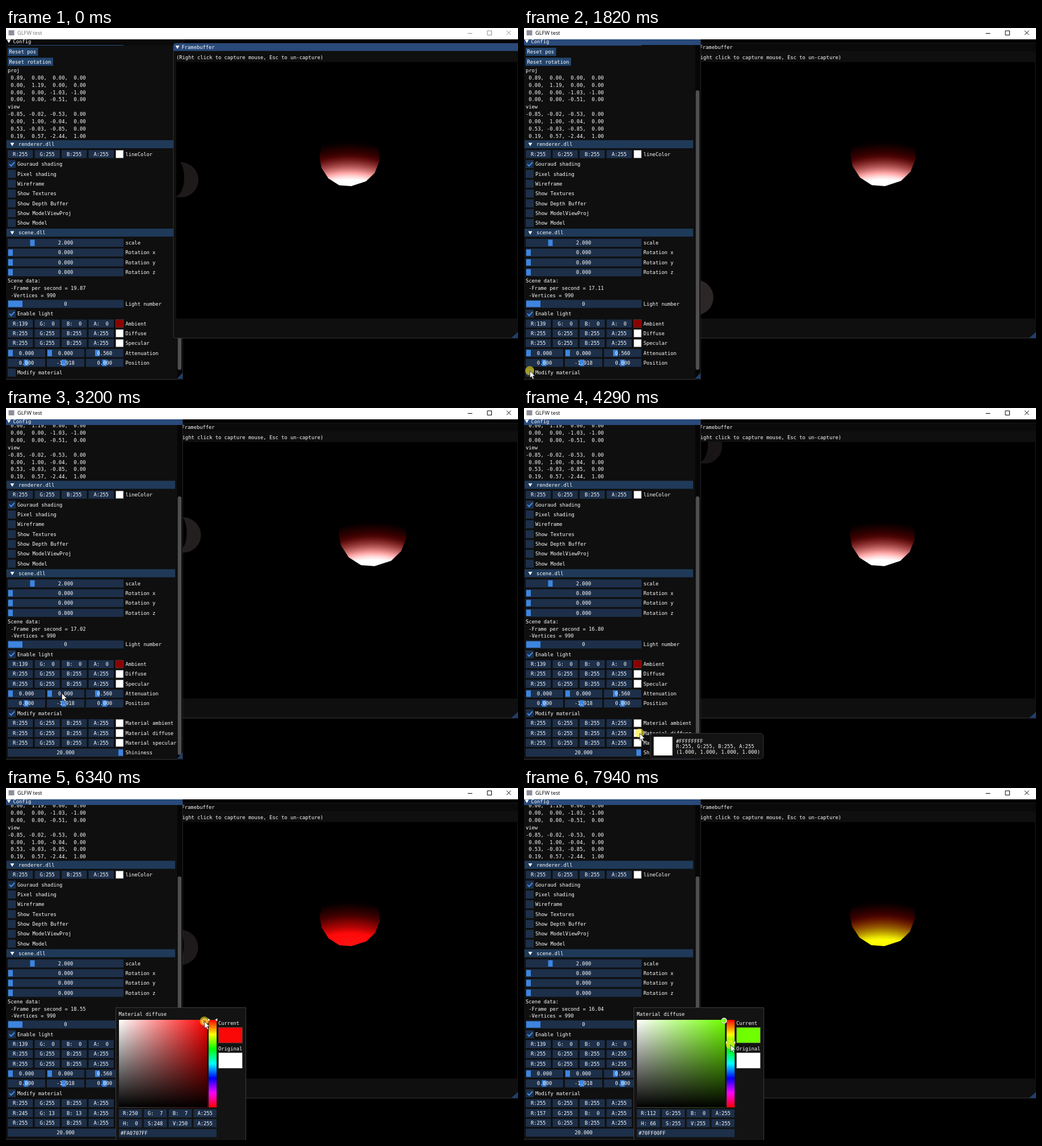
These frames come from a looping animation (902x621 px, 8000 ms). An HTML page:

```html
<!DOCTYPE html>
<html lang="en">
<head>
<meta charset="utf-8">
<title>GLFW test</title>
<style>
html, body { margin: 0; width: 100%; height: 100%; overflow: hidden; background: #000; }
svg { display: block; width: 902px; height: 621px; }
text { font: 8.79px "DejaVu Sans Mono", monospace; fill: #fff; white-space: pre; }
.app { font: 9.3px "Open Sans", sans-serif; }
</style>
</head>
<body>
<svg id="stage" viewBox="0 0 902 621" xmlns="http://www.w3.org/2000/svg"></svg>
<script>
const LOOP = 8000;
const FOCUS = 1750, CHECK = 1860, POPUP = 4420;
const SV_DRAG = [5520, 6600], HUE_DRAG = [6980, LOOP];
const PRESSES = [[1740, 1860], [4200, 4400], SV_DRAG, HUE_DRAG];
const FRAME = '#1d2f49', BUTTON = '#23456d', HEADER = '#1f3958', TITLE = '#294a7a';
const GRAB = '#3d85e0', BG = '#0f0f0f', BORDER = '#34343c';

// time, x, y of the pointer
const POINTER = [
  [280, 800, 640], [420, 640, 580], [820, 125, 480], [1000, 110, 492], [1560, 14, 603],
  [1740, 10, 605], [2050, 12, 605], [2590, 76, 483], [3150, 92, 500], [3450, 130, 520],
  [4050, 203, 573], [4290, 204, 574], [4550, 206, 572], [5200, 300, 446], [5520, 306, 442],
  [6150, 340, 420], [6500, 358, 405], [6650, 358, 405], [6950, 365, 411], [7000, 365, 412],
  [7170, 365, 412], [7240, 365, 413], [7940, 364, 453], [8000, 364, 456]
];
const FPS = [[0, 19.87], [820, 17.07], [2590, 17.14], [4290, 16.8], [5450, 17.08], [7240, 20.03], [7940, 16.04]];
const HULL = [
  [-1, 0], [-.93, .37], [-.7, .72], [-.34, .95], [.06, .98], [.55, .82], [.84, .54],
  [1, .14], [.98, -.16], [.9, -.42], [.6, -.8], [-.6, -.8], [-.9, -.42]
];

const clamp = (v, lo = 0, hi = 1) => Math.min(hi, Math.max(lo, v));
const within = (t, [a, b]) => t >= a && t < b;
const css = c => `rgb(${c.map(Math.round)})`;

function track(keys, t) {
  const i = keys.findIndex(k => k[0] > t);
  if (i === 0) return keys[0].slice(1);
  if (i < 0) return keys[keys.length - 1].slice(1);
  const a = keys[i - 1], b = keys[i], f = (t - a[0]) / (b[0] - a[0]);
  return a.slice(1).map((v, n) => v + (b[n + 1] - v) * f);
}

function hsv(h, s, v) {
  return [5, 3, 1].map(n => {
    const k = (n + h * 6) % 6;
    return 255 * v * (1 - s * clamp(Math.min(k, 4 - k)));
  });
}

function pick(t) {
  let h = 0, s = 0, v = 1;
  if (t >= SV_DRAG[0]) {
    const [x, y] = track(POINTER, Math.min(t, SV_DRAG[1]));
    s = clamp((x - 199) / 155);
    v = clamp(1 - (y - 409) / 154);
  }
  if (t >= HUE_DRAG[0]) h = clamp((track(POINTER, t - 70)[1] - 409) / 154);
  return { h, s, v, rgb: hsv(h, s, v) };
}

// Drawing helpers; y of a row is its centre
const rect = (x, y, w, h, fill, more = '') =>
  `<rect x="${x}" y="${y}" width="${w}" height="${h}" fill="${fill}" ${more}/>`;
const poly = (pts, fill, more = '') => `<polygon points="${pts}" fill="${fill}" ${more}/>`;
const label = (x, y, s, more = '') => `<text x="${x}" y="${y + 3.2}" ${more}>${s}</text>`;
const mid = (x, y, s) => label(x, y, s, 'text-anchor="middle"');
const arrow = (x, y) => poly(`${x - 3.5},${y - 2.5} ${x + 3.5},${y - 2.5} ${x},${y + 3.5}`, '#fff');
const box = (x, y, w, fill = FRAME) => rect(x, y - 7.1, w, 14.2, fill);
const cell = (x, y, w, s) => box(x, y, w) + mid(x + w / 2, y, s);
const grab = (x, y, w = 8) => rect(x, y - 5.6, w, 11.2, GRAB);
const swatch = (x, y, w, h, fill) => rect(x, y, w, h, fill, 'stroke="#555" stroke-width=".6"');
const field = (k, v) => `${k}:${String(Math.round(v)).padStart(3)}`;

function fields(x, y, w, step, names, vals) {
  return vals.map((v, i) => cell(x + i * step, y, w, field(names[i], v))).join('');
}
function colorRow(y, name, rgb, a = 255) {
  return fields(3, y, 44.3, 47.5, 'RGBA', [...rgb, a]) +
    swatch(193.3, y - 6.8, 13.6, 13.6, css(rgb)) + label(210.5, y, name);
}
function slider(y, name, value, x, w) {
  return box(3, y, 204) + grab(x, y, w) + mid(105, y, value) + label(210.5, y, name);
}
function triple(y, name, values, grabs) {
  return values.map((v, i) => box(3 + i * 68.9, y, 66) + grab(grabs[i], y) + mid(36 + i * 68.9, y, v)).join('') +
    label(210.5, y, name);
}
function check(y, name, on) {
  const tick = `<path d="M6 ${y}l3 3.4l6-6.6" fill="none" stroke="#4296fa" stroke-width="1.8"/>`;
  return box(3, y, 14.2) + (on ? tick : '') + label(20, y, name);
}
const header = (y, name) => box(1, y, 297, HEADER) + arrow(11, y) + label(22, y, name);
const button = (y, name, w) => box(3, y, w, BUTTON) + label(5.5, y, name);

function matrix(y, rows) {
  return rows.map((r, i) => label(3, y + i * 12.8, r.map(v => v.toFixed(2).padStart(5)).join(', '))).join('');
}

function planet(t, rgb) {
  const right = 682 - 24 * Math.cos(1.0175 * (t / 1000 - 6.115));
  const left = 552 + .711 * (right - 658);
  const cx = (left + right) / 2, r = (right - left) / 2, cy = 279 - .98 * r;
  let stops = '';
  for (let y = 280; y >= 196; y -= 6) {
    const a = .66 * clamp((y - 201) / 33), d = Math.pow(Math.max(0, (y - 222) / 44), 1.6);
    const c = rgb.map((v, i) => Math.min(255, (i ? 0 : 139 * a) + v * d));
    stops += `<stop offset="${(405 - y) / 209}" stop-color="${css(c)}"/>`;
  }
  return `<radialGradient id="lit" gradientUnits="userSpaceOnUse" cx="${cx}" cy="405" r="209">${stops}</radialGradient>` +
    poly(HULL.map(([x, y]) => [cx + x * r, cy + y * r]).join(' '), 'url(#lit)');
}

function moon(t) {
  const p = t / 1000, s = Math.sin(p), c = Math.cos(p);
  const x = 310 - 8 * s - 2 * c, y = 251.6 + (s > 0 ? 235 : 195) * s + 16 * c;
  const g = 33 + 11 * Math.sin(p - .3);
  return `<circle cx="${x}" cy="${y}" r="31" fill="${css([g, g * .86, g * .88])}"/>` +
    `<ellipse cx="${x - 10}" cy="${y - 4}" rx="16" ry="33" fill="#000"/>`;
}

function framebuffer(t, focused) {
  return rect(295, 27, 612, 520, BG, `rx="4" stroke="${BORDER}"`) +
    `<path d="M295 40.5V31q0-4 4-4H902V40.5z" fill="${focused ? TITLE : '#0a0a0a'}"/>` +
    arrow(302, 33.5) + label(309.5, 34, 'Framebuffer') +
    label(300, 52, '(Right click to capture mouse, Esc to un-capture)') +
    rect(300, 60, 600, 452.5, '#000') +
    `<g clip-path="url(#view)">${moon(t)}${planet(t, pick(t - 80).rgb)}</g>` +
    poly('902,536 902,547 890,547', '#1f3f6b');
}

function config(t, focused) {
  const checked = t >= CHECK;
  const scroll = t > 2960 ? 69.5 : t > 2860 ? 65 : 0;
  const white = [255, 255, 255];
  const bar = !checked ? [110, 493] : [101 + scroll * .79, 463 - scroll * .1];
  const rows = rect(3, 16, 204, 15, TITLE) +
    button(42, 'Reset pos', 53.5) + button(59.5, 'Reset rotation', 80) +
    label(3, 75, 'proj') +
    matrix(87.7, [[.89, 0, 0, 0], [0, 1.19, 0, 0], [0, 0, -1.03, -1], [0, 0, -.51, 0]]) +
    label(3, 139, 'view') +
    matrix(152, [[-.85, -.02, -.53, 0], [0, 1, -.04, 0], [.53, -.03, -.85, 0], [.19, .57, -2.44, 1]]) +
    header(205, 'renderer.dll') + colorRow(222.5, 'lineColor', white) +
    ['Gouraud shading', 'Pixel shading', 'Wireframe', 'Show Textures', 'Show Depth Buffer', 'Show ModelViewProj', 'Show Model']
      .map((s, i) => check(240 + i * 17.35, s, i === 0)).join('') +
    header(361, 'scene.dll') + slider(379, 'scale', '2.000', 42.5) +
    [...'xyz'].map((s, i) => slider(396.2 + i * 17.35, 'Rotation ' + s, '0.000', 4)).join('') +
    label(3, 446, 'Scene data:') +
    label(3, 459, ` -Frame per second = ${track(FPS, t)[0].toFixed(2)}`) +
    label(3, 471.7, ' -Vertices = 990') +
    slider(486.7, 'Light number', '0', 4, 25) + check(504, 'Enable light', true) +
    colorRow(521.4, 'Ambient', [139, 0, 0], 0) + colorRow(538.7, 'Diffuse', white) + colorRow(556, 'Specular', white) +
    triple(573.4, 'Attenuation', ['0.000', '0.000', '0.560'], [4, 73, 157]) +
    triple(590.7, 'Position', ['0.000', '-1.918', '0.000'], [31.5, 98, 169.5]) +
    check(608, 'Modify material', checked) +
    (checked ? colorRow(625.5, 'Material ambient', white) +
      colorRow(643, 'Material diffuse', pick(t - 80).rgb) +
      colorRow(660.2, 'Material specular', white) + slider(677.5, 'Shininess', '20.000', 198) : '');
  return rect(-1, 18, 312, 602, BG, `stroke="${BORDER}"`) +
    `<g clip-path="url(#body)"><g transform="translate(0 ${-scroll})">${rows}</g></g>` +
    rect(301.5, 30, 9, 590, '#060606') + rect(302.5, bar[0], 6.5, bar[1], '#4f4f4f', 'rx="3"') +
    poly('311,608 311,619 301,619', '#1f3f6b') +
    rect(0, 20, 311, 10, focused ? TITLE : '#0a0a0a') + arrow(5, 23) + label(12.5, 23.5, 'Config');
}

function tooltip(x) {
  return rect(x, 574, 199, 45, '#131313', `rx="5" stroke="${BORDER}"`) +
    rect(x + 6, 580, 33, 33, '#fff') +
    ['#FFFFFFFF', 'R:255, G:255, B:255, A:255', '(1.000, 1.000, 1.000, 1.000)']
      .map((s, i) => label(x + 45.5, 587.3 + i * 9.9, s)).join('');
}

function popup(t) {
  const { h, s, v, rgb } = pick(t);
  const x = clamp(199 + 155 * s, 200.5, 352.5), y = clamp(409 + 154 * (1 - v), 410.5, 562);
  const hy = 409 + 154 * h;
  const hex = rgb.map(c => Math.round(c).toString(16).padStart(2, '0')).join('').toUpperCase();
  const nib = 'stroke="#222" stroke-width=".5"';
  return rect(193.5, 387.5, 229, 250, '#131313', 'stroke="#3c3c44"') +
    label(198.5, 398.5, 'Material diffuse') +
    `<linearGradient id="sat"><stop stop-color="#fff"/><stop offset="1" stop-color="${css(hsv(h, 1, 1))}"/></linearGradient>` +
    rect(199, 409, 155, 154.5, 'url(#sat)') + rect(199, 409, 155, 154.5, 'url(#val)') +
    rect(357, 409, 14, 154.5, 'url(#hue)') +
    poly(`355.5,${hy - 3} 360,${hy} 355.5,${hy + 3}`, '#fff', nib) +
    poly(`372.5,${hy - 3} 368,${hy} 372.5,${hy + 3}`, '#fff', nib) +
    `<circle cx="${x}" cy="${y}" r="5.2" fill="#666"/>` +
    `<circle cx="${x}" cy="${y}" r="4.3" fill="${css(rgb)}" stroke="#fff" stroke-width="1.2"/>` +
    label(374, 414.5, 'Current') + swatch(374.3, 422.3, 42, 27.5, css(rgb)) +
    label(374, 459.3, 'Original') + swatch(374.3, 467, 42, 27.5, '#fff') +
    fields(199, 574, 40.5, 43.8, 'RGBA', [...rgb, 255]) +
    fields(199, 591.4, 40.5, 43.8, 'HSVA', [h * 255, s * 255, v * 255, 255]) +
    box(199, 608.7, 172) + label(202, 608.7, `#${hex}FF`);
}

function titleBar(active) {
  const ink = active ? '#000' : '#8a8a8a';
  return rect(0, 0, 902, 20, '#fff') + rect(4.5, 4, 10, 9, '#8d8f9b') +
    `<text class="app" x="20" y="12" style="fill:${active ? '#000' : '#777'}">GLFW test</text>` +
    `<path d="M813.5 9.5h8M848 5h7.5v7.5h-7.5zM882 4.7l7.5 7.5m0-7.5l-7.5 7.5" fill="none" stroke="${ink}"/>`;
}

function pointer(t) {
  const [x, y] = track(POINTER, t);
  const halo = PRESSES.some(p => within(t, p)) ? `<circle cx="${x - .5}" cy="${y - .5}" r="8" fill="#ffeb1e" opacity=".58"/>` : '';
  return halo + `<path transform="translate(${x} ${y})" d="M0 0V12.4L2.8 9.8L4.8 14.4L7 13.4L5 9H8.8z" fill="#fff" stroke="#111" stroke-width=".7"/>`;
}

const stops = list => list.map((c, i) => `<stop offset="${i / (list.length - 1)}" stop-color="${c}"/>`).join('');
const DEFS = `<defs>
  <clipPath id="view">${rect(300, 60, 600, 452.5, '#000')}</clipPath>
  <clipPath id="body">${rect(0, 30, 301, 590, '#000')}</clipPath>
  <linearGradient id="val" x2="0" y2="1"><stop stop-opacity="0"/><stop offset="1"/></linearGradient>
  <linearGradient id="hue" x2="0" y2="1">${stops(['#f00', '#ff0', '#0f0', '#0ff', '#00f', '#f0f', '#f00'])}</linearGradient>
</defs>`;

const stage = document.getElementById('stage');

function draw(t) {
  const active = t >= FOCUS;
  const fb = framebuffer(t, !active), cfg = config(t, active);
  let out = DEFS + rect(0, 0, 902, 621, '#000') + (active ? fb + cfg : cfg + fb) + titleBar(active);
  if (t >= POPUP) out += popup(t);
  else if (t >= 4000) out += tooltip(track(POINTER, t)[0] + 18.5);
  if (t >= POINTER[0][0]) out += pointer(t);
  stage.innerHTML = out;
}

const start = performance.now();
function tick() {
  draw((performance.now() - start) % LOOP);
  requestAnimationFrame(tick);
}
tick();
</script>
</body>
</html>
```
